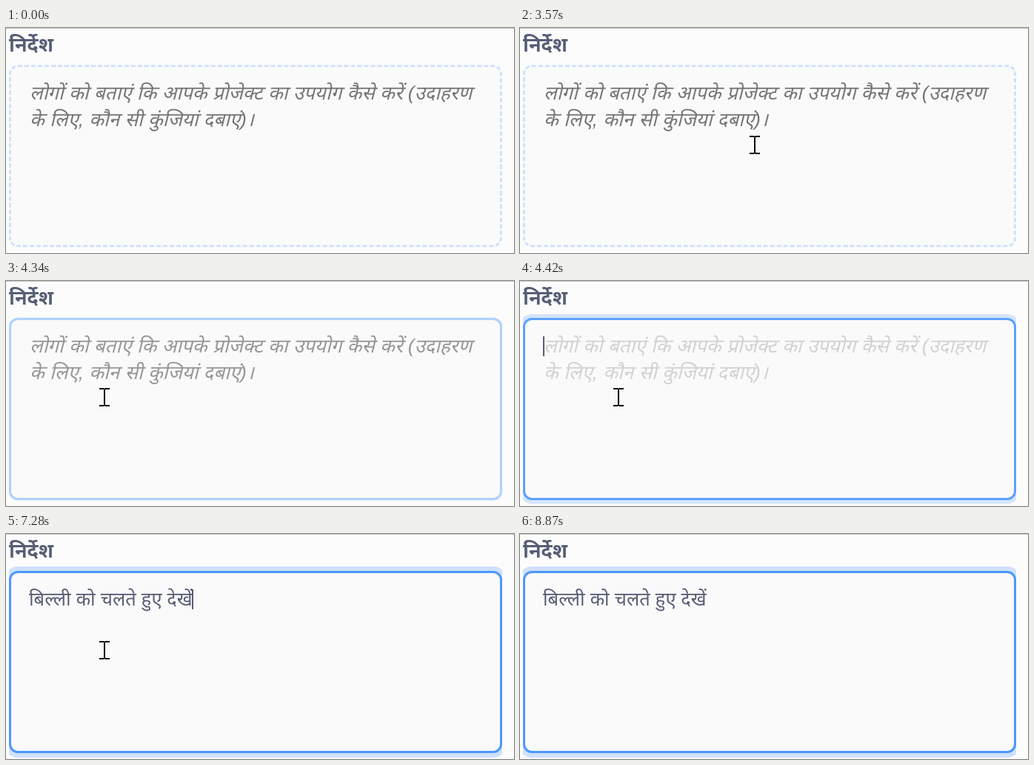
Recreate the animation shown at these times as an HTML page. Size 686x305 px, loop 8990 ms.

```html
<!DOCTYPE html>
<html lang="hi">
<head>
<meta charset="utf-8">
<title>निर्देश</title>
<style>
html, body { margin: 0; width: 100%; height: 100%; overflow: hidden; background: #fcfcfc; }
svg, .clip, .box { position: absolute; }
svg { left: 0; top: 0; }
.rule { position: absolute; left: 0; right: 0; top: 0; height: 1px; background: #c6c6c6; }
.clip { left: 4px; top: 40px; width: 666px; height: 265px; overflow: hidden; }
.box { left: 0; top: 10px; width: 666px; height: 247px; box-sizing: border-box;
  border: 3px dashed #cfe3fb; border-radius: 12px; background: #fafafa; }
text { font-family: "Liberation Sans", "Noto Sans Devanagari", "Noto Sans", sans-serif; font-size: 26px; fill: #575e75; }
.title { font-weight: bold; font-size: 27px; }
.hint text { font-style: italic; fill: #757575; }
.typed { font-size: 25.5px; }

.box, .hint, .typed, .caret, .pointer, .click { animation: 8990ms step-end infinite; }
.box { animation-name: focus; }
.hint { animation-name: fade; }
.typed { animation-name: type; }
.caret { animation-name: blink; fill: #575e75; }
.pointer { animation-name: move; }
.click { animation-name: click; fill: #ff0; fill-opacity: .5; }

@keyframes focus {
  0% { border: 3px dashed #cfe3fb; box-shadow: 0 0 0 0 #cfe1fc; }
  48.27% { border: 3px solid #aed0fc; box-shadow: 0 0 0 1.5px #f0f5fc; }
  49.16% { border: 3px solid #5da1ff; box-shadow: 0 0 0 5px #d5e5fc; }
  49.94% { border: 3px solid #4f99ff; box-shadow: 0 0 0 6px #d0e2fc; }
  50.61%, 100% { border: 3px solid #4c97ff; box-shadow: 0 0 0 6px #cfe1fc; }
}
@keyframes fade {
  0% { opacity: 1; }
  48.27% { opacity: .75; }
  49.16% { opacity: .3; }
  49.94% { opacity: .05; }
  50.61%, 100% { opacity: 0; }
}
@keyframes type {
  0% { opacity: 0; }
  68.96%, 100% { opacity: 1; }
}
@keyframes blink {
  0% { opacity: 0; transform: none; }
  49.16% { opacity: 1; transform: none; }
  54.28% { opacity: 0; transform: none; }
  59.28% { opacity: 1; transform: none; }
  65.29% { opacity: 0; transform: none; }
  68.96% { opacity: 1; transform: translateX(220px); }
  74.97% { opacity: 0; transform: translateX(220px); }
  80.97% { opacity: 1; transform: translateX(220px); }
  86.76% { opacity: 0; transform: translateX(220px); }
  92.65% { opacity: 1; transform: translateX(220px); }
  98.66%, 100% { opacity: 0; transform: translateX(220px); }
}
@keyframes click {
  0% { opacity: 0; }
  46.94% { opacity: 1; }
  48.27%, 100% { opacity: 0; }
}
@keyframes move {
  0% { transform: translate(-50px, -50px); }
  24.13% { transform: translate(431px, 229px); }
  24.91% { transform: translate(368px, 178px); }
  25.69% { transform: translate(331px, 149px); }
  39.71% { transform: translate(317px, 158px); }
  40.37% { transform: translate(308px, 158px); }
  41.15% { transform: translate(290px, 158px); }
  41.82% { transform: translate(262px, 158px); }
  42.60% { transform: translate(230px, 158px); }
  43.38% { transform: translate(199px, 158px); }
  44.04% { transform: translate(172px, 158px); }
  44.82% { transform: translate(152px, 158px); }
  45.49% { transform: translate(139px, 158px); }
  46.16% { transform: translate(133px, 157px); }
  85.31% { transform: translate(140px, 163px); }
  85.98% { transform: translate(175px, 183px); }
  86.76% { transform: translate(238px, 215px); }
  87.43% { transform: translate(310px, 248px); }
  88.20% { transform: translate(370px, 268px); }
  88.87% { transform: translate(408px, 274px); }
  91.21% { transform: translate(418px, 277px); }
  91.99% { transform: translate(432px, 280px); }
  92.65%, 100% { transform: translate(-50px, -50px); }
}
</style>
</head>
<body>
<div class="rule"></div>
<div class="clip"><div class="box"></div></div>
<svg width="686" height="305" viewBox="0 0 686 305">
  <text class="title" x="4" y="31.5">निर्देश</text>
  <g class="hint">
    <text x="32" y="96.5">लोगों को बताएं कि आपके प्रोजेक्ट का उपयोग कैसे करें (उदाहरण</text>
    <text x="32" y="132.5">के लिए, कौन सी कुंजियां दबाएं)।</text>
  </g>
  <text class="typed" x="31" y="96.5">बिल्ली को चलते हुए देखें</text>
  <rect class="caret" x="31" y="75" width="2" height="27"/>
  <path class="pointer" d="M-7-12h6l1 1 1-1h6v2h-6v21h6v2h-6l-1-1-1 1h-6v-2h6v-21h-6z"/>
  <circle class="click" cx="130" cy="156" r="18"/>
</svg>
</body>
</html>
```
